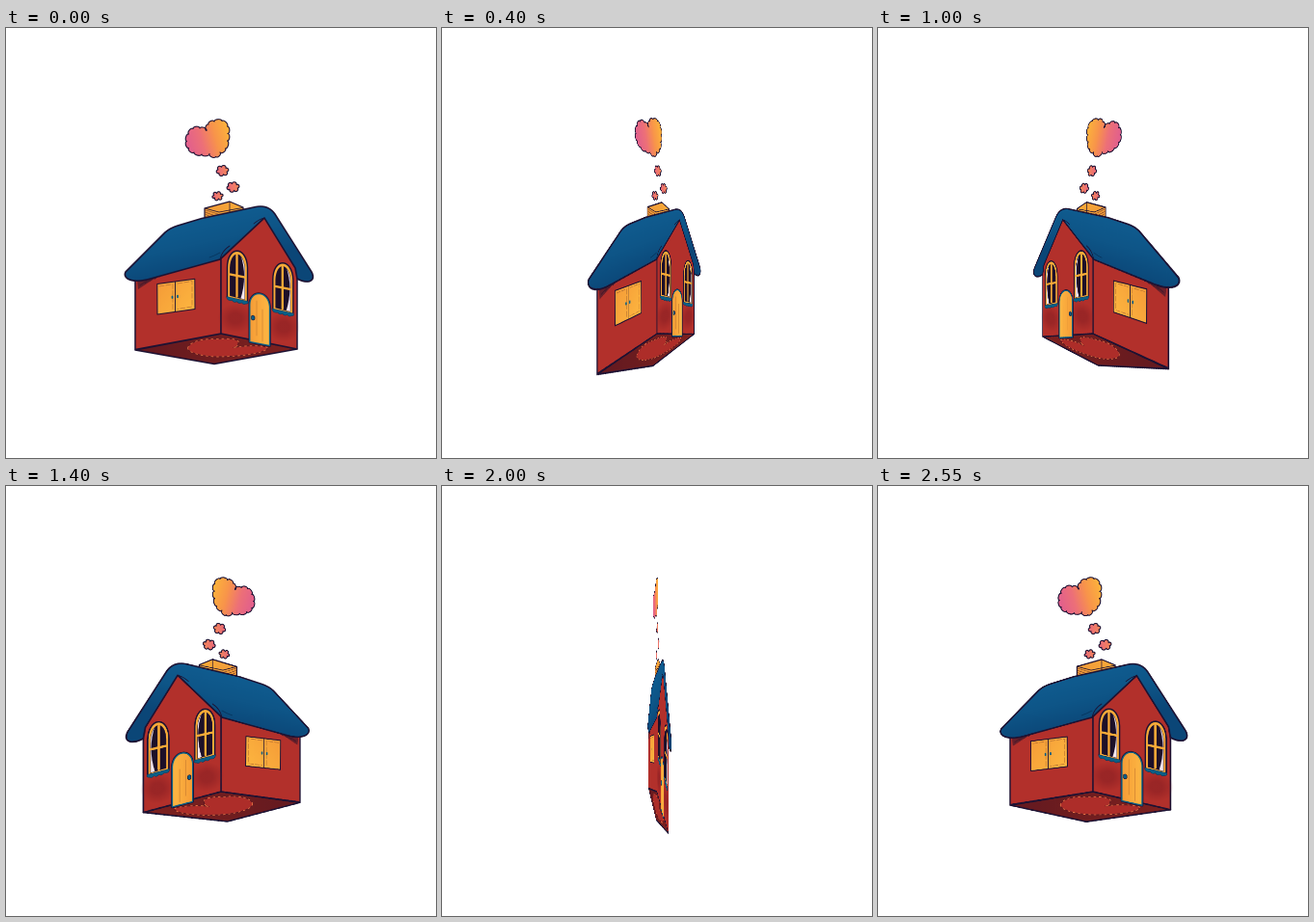
An HTML page with a canvas for the animation above (2600 ms loop, 446 by 446 pixels).

```html
<!DOCTYPE html>
<html lang="en">
<head>
<meta charset="utf-8">
<title>Turning house</title>
<style>
  html, body { margin: 0; width: 100%; height: 100%; overflow: hidden; background: #fff; }
  canvas { display: block; width: 446px; height: 446px; }
</style>
</head>
<body>
<canvas width="446" height="446"></canvas>
<script>
const LOOP = 2600, STEP = 50, DEPTH = 395, SIZE = 446, CENTER = SIZE / 2, DETAIL = 2;
const INK = '#1d1233', RED = '#b2302b', TEAL = '#0b5f86', GOLD = '#f9ab38';
const stage = document.querySelector('canvas').getContext('2d');
const picture = document.createElement('canvas');
picture.width = picture.height = SIZE * DETAIL;
const ctx = picture.getContext('2d');
ctx.scale(DETAIL, DETAIL);
ctx.lineJoin = ctx.lineCap = 'round';

function shape(d, fill, stroke = INK, width = 1.5) {
  const path = new Path2D(d);
  if (fill) { ctx.fillStyle = fill; ctx.fill(path); }
  if (stroke) { ctx.strokeStyle = stroke; ctx.lineWidth = width; ctx.stroke(path); }
}
const line = (d, color = INK, width = 1) => shape(d, null, color, width);

function dashed(d, color, ...pattern) {
  ctx.setLineDash(pattern);
  line(d, color, 0.7);
  ctx.setLineDash([]);
}

function linear(x0, y0, x1, y1, ...colors) {
  const g = ctx.createLinearGradient(x0, y0, x1, y1);
  colors.forEach((c, i) => g.addColorStop(i / (colors.length - 1), c));
  return g;
}

function glow(x, y, rx, ry) {
  ctx.save();
  ctx.translate(x, y);
  ctx.scale(rx, ry);
  const g = ctx.createRadialGradient(0, 0, 0.35, 0, 0, 1);
  g.addColorStop(0, 'rgba(130,28,34,.5)');
  g.addColorStop(1, 'rgba(130,28,34,0)');
  ctx.fillStyle = g;
  ctx.fillRect(-1, -1, 2, 2);
  ctx.restore();
}

// Joins clockwise points with outward bumps.
function cloud(points, bump, fill) {
  let d = 'M' + points[0];
  points.forEach(([x, y], i) => {
    const [nx, ny] = points[(i + 1) % points.length];
    const len = Math.hypot(nx - x, ny - y);
    const ox = (ny - y) / len * bump, oy = (x - nx) / len * bump;
    d += `C${x + ox} ${y + oy} ${nx + ox} ${ny + oy} ${nx} ${ny}`;
  });
  shape(d + 'Z', fill, INK, 1.1);
}

function puff(x, y, rx, ry) {
  const points = Array.from({ length: 6 }, (_, i) => {
    const a = i * Math.PI / 3 + 0.3;
    return [x + rx * Math.cos(a), y + ry * Math.sin(a)];
  });
  cloud(points, 3, linear(x - 6, y, x + 7, y, '#e9687c', '#f68a55'));
}

function smoke() {
  cloud([[208, 106.5], [210, 100], [216, 97], [224, 96.5], [229.5, 102], [230, 109.5],
    [229.5, 117], [227.5, 125], [222, 129], [217.5, 133.5], [211, 130.5], [203, 131],
    [195, 129], [189.5, 124.5], [187.5, 117.5], [189.5, 110], [194, 104.5], [201, 104]],
    2.8, linear(188, 118, 230, 106, '#e2608c', '#ed7078', '#f8944b', '#fcb03c'));
  puff(224.5, 148, 4.8, 3.9);
  puff(235.5, 165, 4.9, 3.6);
  puff(219.5, 174.3, 4, 2.8);
}

function chimney() {
  shape('M206 187L232 180L246 186V198L206 204Z', linear(206, 190, 246, 190, '#f09a3a', GOLD), INK, 1.2);
  line('M206 187L221 191L245 186.5M232 180V193', INK, 0.7);
  for (let i = 0; i < 4; i++) line(`M207 ${189 + i * 2.2}l${13 - i * 2} 4`, '#75402a', 0.6);
}

function walls() {
  shape('M134 334L223 317L302 333L216 348.5Z', linear(150, 334, 290, 334, '#651a20', '#7c211f'));
  const heart = 'M188.5 332C190 325 205 322 219 322.5C234 321.5 243 323 241 327Q240 331 236 331.5C247 329 270 329 271.5 332C267 338 241 341 217 341C202 340 189 337 188.5 332Z';
  shape(heart, '#ad2d29', '#5d1820', 0.9);
  dashed(heart, '#ec7947', 2, 3.5);
  shape('M134 258L223 238V317L134 333.5Z', RED);
  shape('M223 239L268 195L302 248V333L223 317Z', RED);
  shape('M136 261L172 253L157 258L137 271Z', '#68202a', null);
  for (let i = 0; i < 6; i++) line(`M${139 + i * 5} ${267 - i * 2.2}l7 -5`, '#431a2c', 0.8);
  glow(238, 301, 18, 15);
  glow(288, 310, 17, 15);
}

function roof() {
  shape('M124 253L165 212Q170 207.5 178 205L203 197.5L259 185.5Q272 183 279 193L317 253Q321 261 314 263Q308 263.5 302 260L300 249L268 197L222 240L150 260Q134 264.5 126 260Q122 257 124 253Z',
    linear(190, 195, 203, 253, '#105d91', '#0e5587', '#0b4677'), INK, 1.6);
  line('M222 240Q224 231 232 226M268 197Q263 198 257 203', INK, 0.8);
  line('M216 236L222 233M211 238L216 236', '#08365f', 0.8);
}

function shutters() {
  shape('M156.8 265.5L195.8 260.3L196 291.5L157 297Z', linear(157, 265, 195, 295, '#f59c38', '#fdb740'), INK, 1);
  line('M175.5 263V294', INK, 0.9);
  dashed('M159 268L173 265.7V292M178 265L193 262.5V289L178 291.5', '#bd7630', 5, 2);
  shape('M172.5 278.5v1.5M178 277.7v1.5', null, TEAL, 1.8);
}

function archWindow(x, y) {
  ctx.save();
  ctx.translate(x, y);
  shape('M0 48V17C0 -6 20 -6 21 17V53Z', GOLD, INK, 1.4);
  const pane = 'M3 46V17C4 -1 16 -1 18 17V50Z';
  shape(pane, '#1d1028', INK, 0.8);
  ctx.save();
  ctx.clip(new Path2D(pane));
  shape('M12 0Q22 24 13 51H21V0Z', '#f5e8ef', INK, 0.6);
  ctx.restore();
  line('M10 4V47M3 24L18 27', GOLD, 2.3);
  shape('M-1 47L21.5 52Q22.5 55 19 54.5Q17 56 15 53.5Q12 55 10 52.3Q7 54 5 51Q0 52 -1 47Z', TEAL, '#123a5d', 0.6);
  ctx.restore();
}

function door() {
  const frame = 'M252.8 325.5V287C253 271.5 272 271.5 273.5 289V329.5Z';
  line(frame, INK, 2.6);
  shape(frame, linear(252, 300, 273, 300, '#f59b36', '#fdb743'), TEAL, 1.3);
  line('M260 283V319M266 292V325', '#ce8132', 0.7);
  shape('M254.5 299Q256.5 297 258 299.5V302Q256 304 254.5 302Z', TEAL, INK, 0.6);
}

smoke();
chimney();
walls();
roof();
shutters();
archWindow(229.5, 231.5);
archWindow(276.8, 244);
door();

// Projects the flat picture, turned about its vertical axis, one column at a time.
function project(angle) {
  const cos = Math.cos(angle), sin = Math.sin(angle);
  const unproject = x => x * DEPTH / (DEPTH * cos - x * sin);
  stage.fillStyle = '#fff';
  stage.fillRect(0, 0, SIZE, SIZE);
  for (let x = 0; x < SIZE; x++) {
    const a = unproject(x - CENTER), b = unproject(x + 1 - CENTER);
    if (Math.max(Math.abs(a), Math.abs(b)) > CENTER) continue;
    const scale = DEPTH / (DEPTH + (a + b) / 2 * sin);
    stage.drawImage(picture,
      (Math.min(a, b) + CENTER) * DETAIL, 0, Math.abs(b - a) * DETAIL, picture.height,
      x, CENTER - CENTER * scale, 1, SIZE * scale);
  }
}

const start = performance.now();
function turn() {
  const t = Math.floor((performance.now() - start) % LOOP / STEP) * STEP;
  project(t / LOOP * 2 * Math.PI);
  requestAnimationFrame(turn);
}
turn();
</script>
</body>
</html>
```
